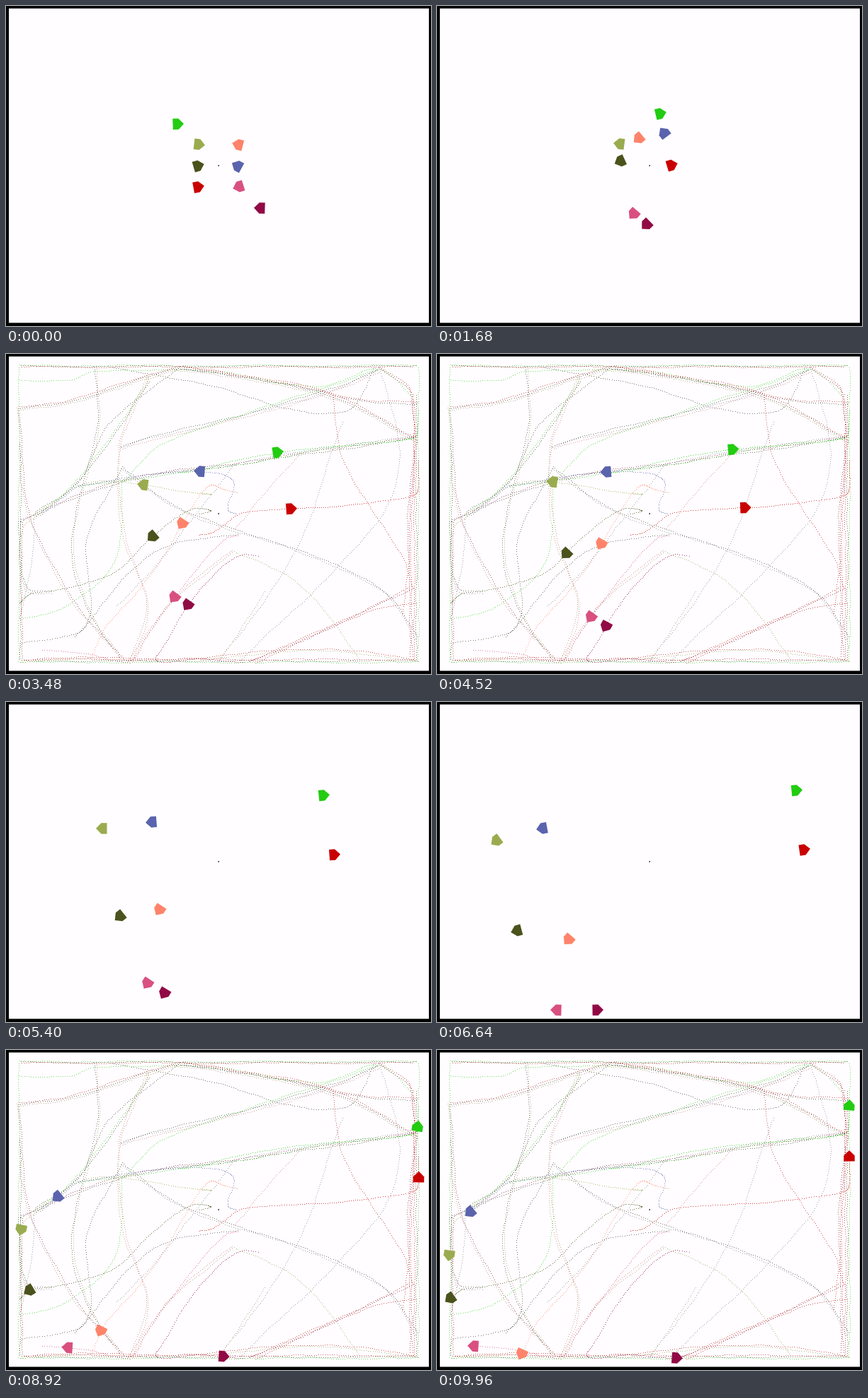
An HTML page for the animation above (10000 ms loop, 600x453 px).

```html
<!DOCTYPE html>
<html lang="en">
<head>
<meta charset="utf-8">
<title>Robots and trails</title>
<style>
  html, body { margin: 0; width: 100%; height: 100%; overflow: hidden; background: #000; }
  svg { display: block; width: 600px; height: 453px; }
</style>
</head>
<body>
<svg id="stage" viewBox="0 0 600 453" xmlns="http://www.w3.org/2000/svg">
  <rect width="600" height="453" fill="#000"/>
  <rect x="4" y="3.5" width="593" height="445" fill="#fffdff"/>
  <g id="trails" fill="none" stroke-width="1" stroke-opacity=".72"></g>
  <rect x="299.4" y="225.2" width="1.6" height="1.6" fill="#222"/>
  <g id="robots"></g>
</svg>
<script>
const LOOP = 10000, STEP = 40;
const FAST = 46.5, SLOW = 33;              // px per second, trails hidden / shown
const SHOWN = [[2240, 5280], [7540, LOOP]];
const TIMES = [0, 600, 1680, 3480, 5400, 6100, 6640, 7840, 8600, 9960];
const BODY = "-7.5,-7.7 0.5,-7.7 8,0 0.5,7.7 -7.5,7.7";
const INK = {
  green: "#3fd42c", olive: "#9aa560", dark: "#4d5340", red: "#c22a2a",
  rose: "#cf8080", wine: "#8a3048", gray: "#888994", tan: "#b09570"
};

const trails = document.getElementById("trails");
const robotLayer = document.getElementById("robots");

let seed = 7;
const random = () => (seed = seed * 16807 % 2147483647) / 2147483647;

function add(parent, tag, attrs) {
  const el = document.createElementNS("http://www.w3.org/2000/svg", tag);
  for (const k in attrs) el.setAttribute(k, attrs[k]);
  parent.appendChild(el);
  return el;
}

const parse = text => text.trim().split(/\s+/).map(p => p.split(",").map(Number));

// Distance driven until t: robots slow down while the trails are shown.
function driven(t) {
  let shown = 0;
  for (const [a, b] of SHOWN) shown += Math.max(0, Math.min(t, b) - a);
  return (FAST * (t - shown) + SLOW * shown) / 1000;
}

// Smooth curve that passes pts[i] at us[i].
function spline(pts, us) {
  const last = pts.length - 1;
  const slopes = pts.map((_, i) => {
    const a = Math.max(0, i - 1), b = Math.min(last, i + 1);
    return [0, 1].map(k => (pts[b][k] - pts[a][k]) / (us[b] - us[a]));
  });
  return u => {
    u = Math.min(u, us[last]);
    let i = 0;
    while (i < last - 1 && u > us[i + 1]) i++;
    const h = us[i + 1] - us[i], s = (u - us[i]) / h;
    const [x, y, dx, dy] = [0, 1, 2, 3].map(n => {
      const k = n % 2, p = pts[i][k], q = pts[i + 1][k], m = slopes[i][k], w = slopes[i + 1][k];
      return n < 2
        ? p + (q - p) * s * s * (3 - 2 * s) + h * s * (1 - s) * (m * (1 - s) - w * s)
        : 6 * s * (1 - s) * (q - p) / h + m * (1 - s) * (1 - 3 * s) + w * s * (3 * s - 2);
    });
    return { x, y, angle: Math.atan2(dy, dx) * 180 / Math.PI };
  };
}

// Row of single dots along a curve, shifted and slightly wavering.
function dots(curve, length, stroke, shift, waver) {
  const a = random() * 6, b = random() * 6;
  let d = "";
  for (let u = random() * 3; u < length; u += 3.2) {
    const p = curve(u), r = p.angle * Math.PI / 180;
    const off = shift + waver * (Math.sin(u / 8 + a) * .5 + Math.sin(u / 27 + b) * .8);
    d += `M${Math.round(p.x - Math.sin(r) * off)},${Math.round(p.y + Math.cos(r) * off) + .5}h1`;
  }
  add(trails, "path", { d, stroke });
}

// One row of dots per named ink, side by side.
function trail(inks, text) {
  const pts = parse(text), us = [0];
  for (let i = 1; i < pts.length; i++)
    us[i] = us[i - 1] + Math.hypot(pts[i][0] - pts[i - 1][0], pts[i][1] - pts[i - 1][1]);
  const curve = spline(pts, us);
  inks.split(" ").forEach((ink, n) => dots(curve, us[us.length - 1], INK[ink], n * 2.5, 1));
}

// Across the top
trail("red dark tan", "18,75 90,64 200,30 245,18 330,30 460,57 580,119");
trail("dark", "150,20 280,42 400,77 486,78 520,18");
trail("green", "18,36 90,37 130,24 300,25 445,46 525,20 575,62");
trail("red dark", "245,18 400,40 490,62 580,68");
trail("dark gray rose", "161,131 190,120 300,94 470,45 525,20");
trail("green", "165,180 220,128 380,70 525,22");

// Fans from the left wall
trail("green dark", "38,228 95,184 150,112 202,35");
trail("dark", "40,225 100,182 145,100 245,17");
trail("wine dark", "19,234 163,178 316,155 580,116");
trail("gray green", "100,186 230,167 316,156 450,132 575,117");

// Long sweeps downwards
trail("tan dark", "128,17 130,105 94,270 120,365 162,430");
trail("rose tan", "202,30 162,130 166,250 200,355 178,435");
trail("dark", "163,160 115,260 112,385 20,410");
trail("green", "163,170 153,295 80,358 19,376");
trail("wine tan", "18,75 33,225 90,340 165,432");
trail("gray", "40,232 37,280 20,375");
trail("dark gray", "20,235 28,330 65,336");

// Middle
trail("dark gray", "163,159 250,221 400,273 530,332 582,403");
trail("dark", "95,402 212,278 328,255");
trail("gray", "155,359 225,282 322,155");
trail("rose tan", "172,435 232,350 318,278");
trail("olive", "318,278 415,326 500,434");
trail("gray", "330,435 520,242 556,145 527,20");
trail("gray", "300,435 405,285 475,95");
trail("rose", "415,140 322,247");
trail("tan", "300,434 367,335");
trail("red", "460,58 480,160 560,287 573,330");

// Lower right
trail("red wine", "340,435 450,388 575,328");
trail("red", "350,437 520,361 581,353");
trail("red olive", "20,434 110,428 220,432 450,417 581,433");
trail("red wine", "527,18 574,56 570,240 574,430");
trail("red", "560,370 573,220 575,55");

// Rounds along the walls
["green", "dark", "red"].forEach((ink, n) => {
  const l = 18 + n * 2, t = 16 + n, r = 582 - n * 3, b = 436 - n * 2;
  trail(ink, `${l},${t} ${r},${t}`);
  trail(ink, `${r},${t + n * 40} ${r},${b}`);
  trail(ink, `${r},${b} ${l},${b}`);
  trail(ink, `${l},${b} ${l},${t + n * 110}`);
});

// Each robot passes one point at each of TIMES.
const stops = TIMES.map(driven);
const robots = [
  ["#22cc11", "243,167 270,166 316,152 384,139 449,132 482,129 508,125 561,121 579,115 582,78"],
  ["#9aab4f", "273,196 290,198 257,195 193,185 135,179 104,185 83,197 43,230 24,245 17,291"],
  ["#4b521c", "272,226 289,221 258,220 206,259 160,304 133,317 112,324 63,336 38,338 18,352"],
  ["#c90000", "272,256 293,252 332,225 403,219 464,216 495,212 519,209 575,200 582,188 582,150"],
  ["#ff836b", "327,196 308,191 284,188 248,241 216,295 198,319 185,337 153,371 138,389 119,431"],
  ["#5a63ad", "326,226 313,219 320,179 273,166 205,170 173,174 148,179 99,188 80,202 46,230"],
  ["#d9507f", "328,256 309,262 277,295 237,345 199,399 184,427 168,436 121,425 97,422 51,419"],
  ["#910a45", "358,286 330,285 295,310 256,356 223,413 211,432 227,436 274,431 298,433 339,436"]
].map(([fill, text]) => {
  const pose = spline(parse(text), stops);
  dots(pose, stops[stops.length - 1], fill, 0, .5);
  return { pose, el: add(robotLayer, "polygon", { points: BODY, fill }) };
});

function draw(now) {
  const t = Math.floor(now % LOOP / STEP) * STEP;
  const shown = SHOWN.some(([a, b]) => t >= a && t < b);
  trails.setAttribute("visibility", shown ? "visible" : "hidden");
  for (const { pose, el } of robots) {
    const p = pose(driven(t));
    el.setAttribute("transform",
      `translate(${p.x.toFixed(2)} ${p.y.toFixed(2)}) rotate(${p.angle.toFixed(1)})`);
  }
}

const start = performance.now();
function tick() {
  draw(performance.now() - start);
  requestAnimationFrame(tick);
}
tick();
</script>
</body>
</html>
```
